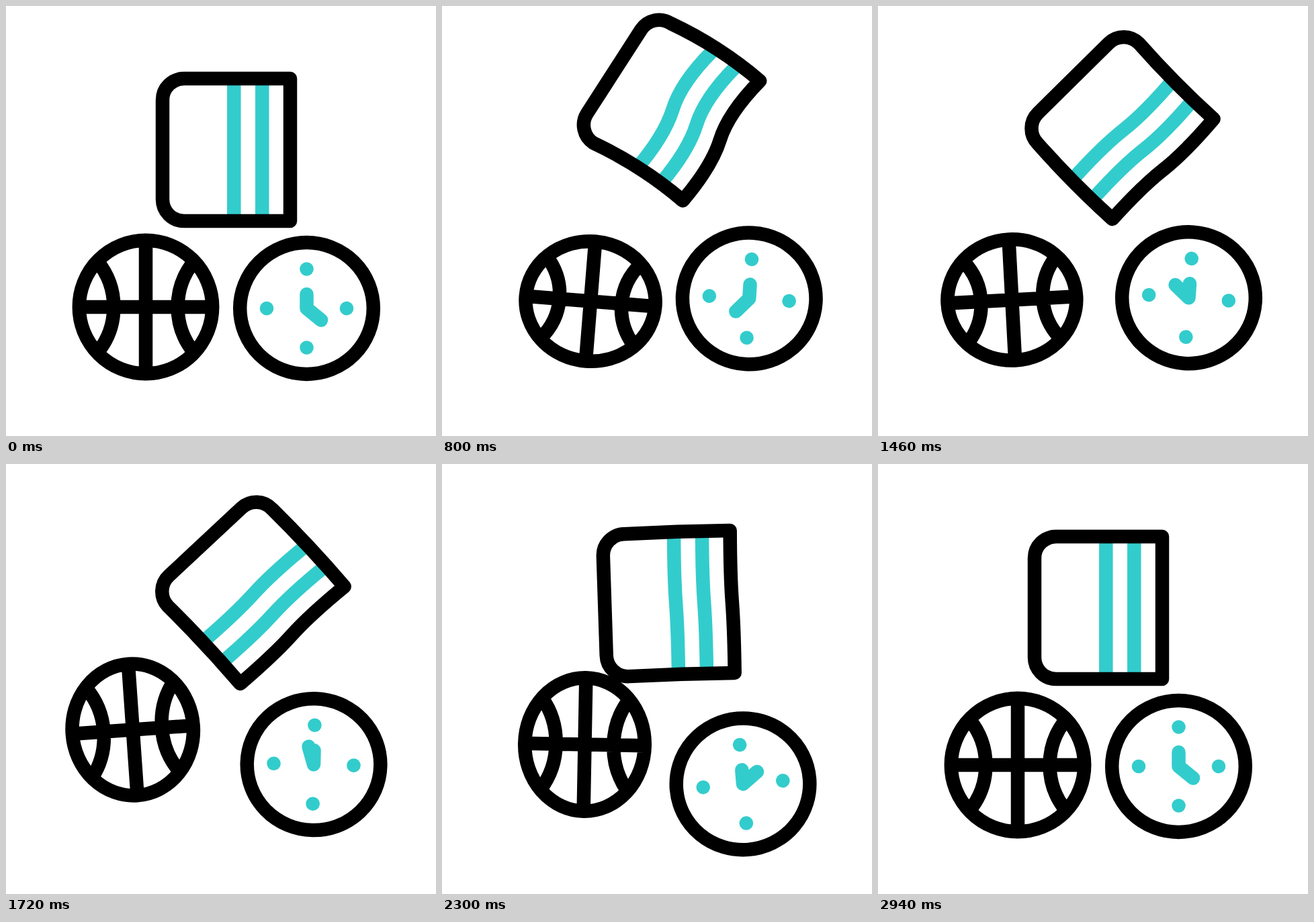
Animation, 640 px wide and 640 px high, one loop 3000 ms. Source, as an HTML page:

```html
<!DOCTYPE html>
<html lang="en">
<head>
<meta charset="utf-8">
<title>Towel, ball and clock</title>
<style>
  html, body { margin: 0; width: 100%; height: 100%; overflow: hidden; background: #fff; }
  svg { display: block; width: 100%; height: 100%; }
  .ink, .teal { fill: none; stroke-width: 20.5; stroke-linejoin: round; }
  .ink { stroke: #000; }
  .teal { stroke: #3cc; }
  .dot { fill: #3cc; }
</style>
</head>
<body>
<svg viewBox="0 0 640 640">
  <g id="towel">
    <path id="stripes" class="teal"/>
    <path id="cloth" class="ink"/>
  </g>
  <g id="ball"><path id="seams" class="ink"/></g>
  <g id="clock">
    <ellipse class="ink" rx="99.3" ry="97.9"/>
    <g class="dot">
      <circle cy="-58.5" r="10.3"/><circle cy="58.5" r="10.3"/>
      <circle cx="-59.5" r="10.3"/><circle cx="59.5" r="10.3"/>
    </g>
    <path id="hands" class="teal" stroke-linecap="round"/>
  </g>
</svg>
<script>
const LOOP = 3000, STEP = 20, START = 120, END = 2940;
const HOP = 645, FIRST_LANDING = 690, LAST_LANDING = FIRST_LANDING + 3 * HOP;

const $ = id => document.getElementById(id);
const mix = (a, b, u) => a + (b - a) * u;
const ramp = (t, from, to) => Math.min(1, Math.max(0, (t - from) / (to - from)));
const ease = (t, from, to) => {
  const u = ramp(t, from, to);
  return u * u * (3 - 2 * u);
};

// Smooth monotone curve through [time, value] keys, resting at turning points.
function track(...keys) {
  const rate = i => (keys[i + 1][1] - keys[i][1]) / (keys[i + 1][0] - keys[i][0]);
  const last = keys.length - 1;
  const slopes = keys.map((_, i) => {
    if (i === 0 || i === last) return 0;
    const a = rate(i - 1), b = rate(i);
    return a * b > 0 ? 2 * a * b / (a + b) : 0;
  });
  return t => {
    if (t <= keys[0][0]) return keys[0][1];
    if (t >= keys[last][0]) return keys[last][1];
    const i = keys.findIndex(k => k[0] > t) - 1;
    const [t0, v0] = keys[i], [t1, v1] = keys[i + 1];
    const d = t1 - t0, u = (t - t0) / d, w = 1 - u;
    return w * w * ((1 + 2 * u) * v0 + u * d * slopes[i])
         + u * u * ((1 + 2 * w) * v1 - w * d * slopes[i + 1]);
  };
}

const towelX = track([350, 328], [1770, 361.5], [2580, 328]);
const towelTurn = track([START, 0], [380, 11.6], [800, 32.8], [1740, 47], [2500, -12], [END, 0]);
const towelBend = track([START, 0], [650, 1.1], [1460, -.4], [1980, 1], [2400, 0]);
const ballSwing = track([START, 0], [350, -48], [1015, 33], [1660, -21], [1980, 0], [2300, 4.5], [END, 0]);
const clockY = track([START, 450], [1200, 428.8], [2460, 478.5], [END, 450]);
const clockTurn = track([START, 0], [1200, 5.2], [2460, -5.2], [END, 0]);

const place = (id, x, y, angle) =>
  $(id).setAttribute('transform', `translate(${x} ${y}) rotate(${angle})`);
const draw = (id, d) => $(id).setAttribute('d', d);

function drawTowel(t) {
  const bend = towelBend(t), lift = 11 * bend;
  const wave = (x, h) => `Q${x - 14 * bend} -40 ${x - 2.5 * bend} 0Q${x + 9 * bend} 40 ${x} ${h}`;
  const stripe = x => `M${x} -104${wave(x, 104)}`;
  const rise = Math.min(ease(t, START, 700), ramp(t, 2450, 620));
  place('towel', towelX(t), 214 - 72 * rise, towelTurn(t));
  draw('stripes', stripe(11.3) + stripe(53.3));
  draw('cloth', `M-63 -106Q16 ${-106 - lift} 95 -106${wave(95, 106)}` +
    `Q16 ${106 - lift} -63 106A32 32 0 0 1 -95 74V-74A32 32 0 0 1 -63 -106Z`);
}

function drawBall(t) {
  // Each hop stretches in the air, squashes on landing and loses height.
  const hops = (Math.min(t, LAST_LANDING) - FIRST_LANDING) / HOP + 1;
  const air = Math.sin(Math.PI * hops) ** 2;
  const height = 84 - 1.5 * Math.floor(hops) ** 3;
  const active = ease(t, START, 330) - ease(t, LAST_LANDING, END);
  const w = mix(1, mix(1, .9, air), active);
  const h = mix(1, mix(.864, 1, air), active);
  const y = mix(448, 461 - height * air, active);

  const rx = 99.2 * w, ry = 99.2 * h;
  const seam = (side, sweep) =>
    `M${side * 72 * w} ${-68 * h}A${107 * w} ${107 * h} 0 0 ${sweep} ${side * 72 * w} ${68 * h}`;
  place('ball', 208 + ballSwing(t), y, .24 * ballSwing(t + 40));
  draw('seams', `M${-rx} 0A${rx} ${ry} 0 0 1 ${rx} 0A${rx} ${ry} 0 0 1 ${-rx} 0Z` +
    `H${rx}M0 ${-ry}V${ry}` + seam(-1, 1) + seam(1, 0));
}

function drawClock(t) {
  const drift = Math.min(ramp(t, START, 1200) ** 1.5, ramp(t, 2330, 1200));
  const u = ramp(t, START, END);
  const angle = 39 * Math.PI / 180 + 2 * Math.PI * u + .17 * Math.sin(Math.PI * u);
  place('clock', 447.5 + 19.5 * drift, clockY(t), clockTurn(t));
  draw('hands', `M0 -21V0L${27.7 * Math.cos(angle)} ${27.7 * Math.sin(angle)}`);
}

function frame() {
  const t = Math.floor(performance.now() % LOOP / STEP) * STEP;
  drawTowel(t);
  drawBall(t);
  drawClock(t);
  requestAnimationFrame(frame);
}
frame();
</script>
</body>
</html>
```
